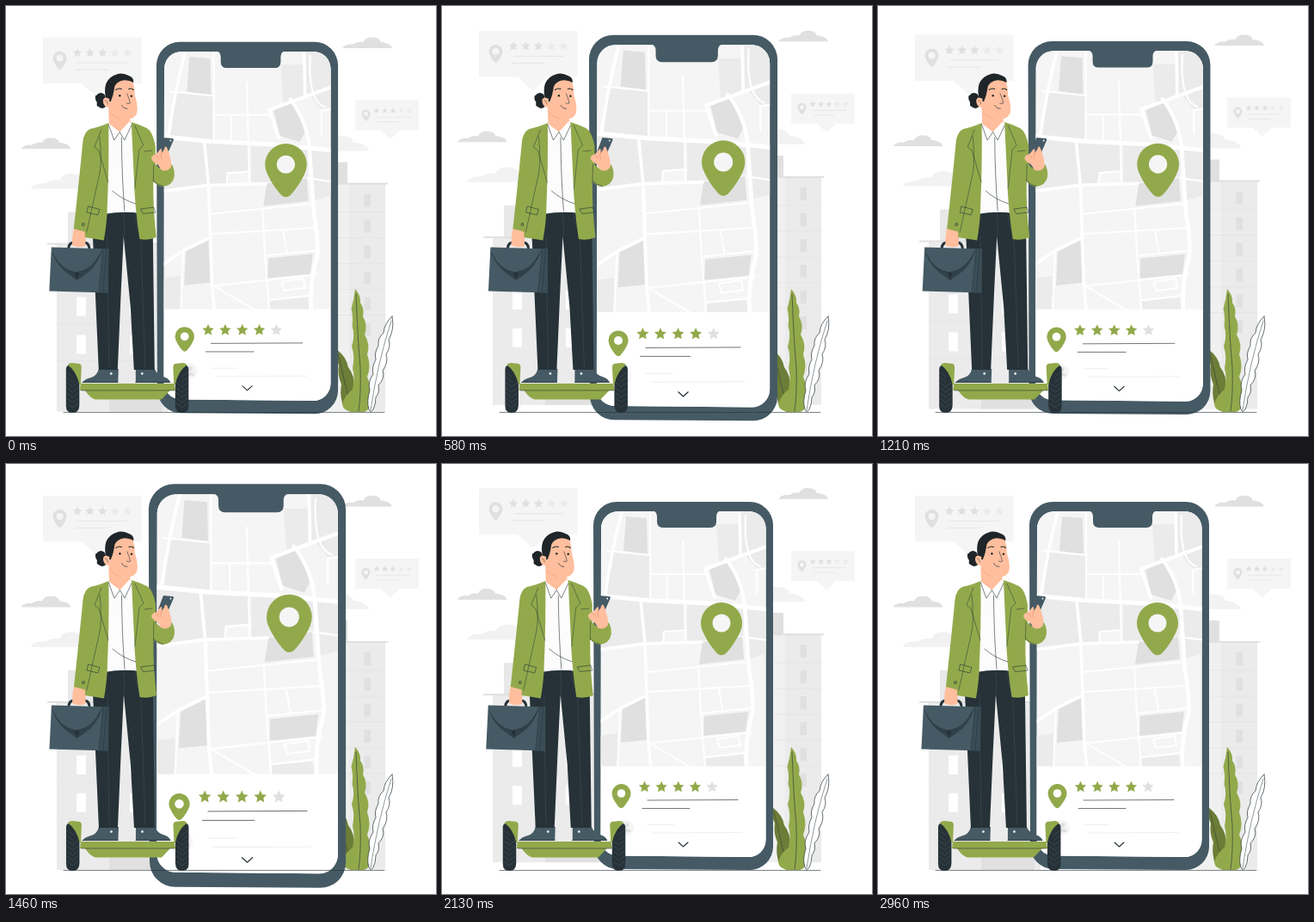
Write an HTML page with a canvas that moves like this. It is 500 px wide and 500 px high and loops after 3000 ms.

```html
<!DOCTYPE html>
<html lang="en">
<head>
<meta charset="utf-8">
<title>Map review</title>
<style>
html, body { margin: 0; width: 100%; height: 100%; overflow: hidden; background: #fff; }
canvas { display: block; width: 500px; height: 500px; }
</style>
</head>
<body>
<canvas id="stage"></canvas>
<script>
const canvas = document.getElementById('stage');
const ctx = canvas.getContext('2d');
const dpr = window.devicePixelRatio || 1;
canvas.width = canvas.height = 500 * dpr;

const LOOP = 3000, LEAD = 30;
const GREEN = '#92a94b', OLIVE = '#6c7d37', DARK = '#263238', SLATE = '#455a64', HAIR = '#1f2528', SKIN = '#ffbe9d';
const G1 = '#f5f5f5', G2 = '#ebebeb', G3 = '#e0e0e0';

const cache = {};
const path = d => cache[d] || (cache[d] = new Path2D(d));

function fill(d, color) {
  ctx.fillStyle = color;
  ctx.fill(path(d));
}
function line(d, color = DARK, w = 0.8) {
  ctx.strokeStyle = color;
  ctx.lineWidth = w;
  ctx.stroke(path(d));
}
function rect(x, y, w, h, color) {
  ctx.fillStyle = color;
  ctx.fillRect(x, y, w, h);
}
function dot(x, y, r, color) {
  ctx.fillStyle = color;
  ctx.beginPath();
  ctx.arc(x, y, r, 0, Math.PI * 2);
  ctx.fill();
}
function star(x, y, r, color) {
  ctx.fillStyle = color;
  ctx.beginPath();
  for (let i = 0; i < 10; i++) {
    const a = i * Math.PI / 5 - Math.PI / 2, q = i % 2 ? r * 0.48 : r;
    ctx.lineTo(x + q * Math.cos(a), y + q * Math.sin(a));
  }
  ctx.fill();
}
function stars(x, y, step, r, lit, color, dim) {
  for (let i = 0; i < 5; i++) star(x + i * step, y, r, i < lit ? color : dim);
}
function pin(x, y, r, drop, hole, color, inner) {
  ctx.fillStyle = color;
  ctx.beginPath();
  ctx.arc(x, y, r, Math.PI * 0.87, Math.PI * 0.13);
  ctx.bezierCurveTo(x + r * 0.74, y + r * 0.82, x + r * 0.42, y + drop * 0.82, x + r * 0.2, y + drop * 0.96);
  ctx.quadraticCurveTo(x, y + drop * 1.06, x - r * 0.2, y + drop * 0.96);
  ctx.bezierCurveTo(x - r * 0.42, y + drop * 0.82, x - r * 0.74, y + r * 0.82, x - r * 0.91, y + r * 0.4);
  ctx.fill();
  dot(x, y, hole, inner);
}
function cloud(x, y, s) {
  ctx.save();
  ctx.translate(x, y);
  ctx.scale(s, s);
  fill('M0 13C1 10 6 8 12 8.500C16 6 20 5 24 6C26 1 31 0 34 0.500C40 0 44 3 44 6C49 6 56 8 57.500 13Z', s > 1 ? '#f2f2f2' : G3);
  ctx.restore();
}

// Linear interpolation over [position, value] stops
function track(stops, p) {
  let i = 1;
  while (i < stops.length - 1 && p > stops[i][0]) i++;
  const [a, u] = stops[i - 1], [b, v] = stops[i];
  return u + (v - u) * (p - a) / (b - a);
}
const BEAT = [[0, 1], [0.1, 1.1], [0.3, 1], [0.4, 1], [0.5, 1.1], [0.6, 1], [1, 1]];
const SHAKE = [0, -1, 2, -4, 4, -4, 4, -4, 2, -1, 0].map((v, i) => [i / 10, v]);
const FLOAT = [[0, 0], [0.5, -10], [1, 0]];

function background() {
  fill('M43 37H157.500V90.500H122L106 107L88 90.500H43Z', G1);
  pin(62.5, 61, 8, 13, 4, G3, G1);
  stars(83, 55, 14.6, 5.6, 3, G3, G2);
  line('M84 66.500H141M81 74.500H119', '#e4e4e4', 0.9);

  fill('M406 110H480V145H458L447 155.500L436 145H406Z', G1);
  pin(418.5, 126, 5, 8, 2.5, G3, G1);
  stars(431, 122.3, 9.5, 3.6, 3, G3, G2);
  line('M430 129.500H470M432 135H456', '#e4e4e4', 0.8);

  cloud(391.5, 36.5, 1);
  cloud(18, 153.5, 1);
  cloud(29, 195, 1.38);
  cloud(343, 151, 1.38);

  rect(72, 240, 90, 37, '#e8e8e8');
  rect(59, 277, 130, 195, G2);
  rect(48, 276, 141, 2, G3);
  line('M59 326H189M59 370H189M59 413H189', '#e4e4e4', 0.7);
  for (const y of [296, 339, 383]) {
    rect(82, y, 11, 22, '#fff');
    rect(144, y, 11, 22, '#fff');
  }
  rect(120, 458, 62, 14, G3);

  rect(372, 182, 25, 25, G3);
  rect(370, 207, 71, 265, G2);
  rect(370, 207, 29, 265, '#f0f0f0');
  rect(370, 206, 74, 2, G3);
  line('M370 240H441M370 270H441M370 300H441M370 330H441M370 360H441', '#e2e2e2', 0.7);
  for (let i = 0; i < 6; i++) rect(416.5, 219 + i * 30, 7.5, 15, G3);
}

function plants() {
  fill('M384 399Q396 408 398 420Q406 431 404 441L408 472H402Q394 470 391 462Q388 450 390 440Q385 428 387 418Q383 410 384 399Z', OLIVE);
  line('M386 404Q393 435 402 470', DARK, 0.5);
  fill('M406 329Q413 337 412 345Q417 352 415 361Q421 371 417 382Q424 394 420 405Q425 419 420 431Q427 447 424 460Q424 470 416 472H403Q392 471 391 463Q394 452 403 446Q406 432 403 421Q406 407 402 396Q406 383 402.500 372Q404 362 401.500 352Q405 340 406 329Z', GREEN);
  line('M407 335Q409 390 412 420Q413 450 410 471', DARK, 0.6);
  const leaf = 'M449 361Q440 369 439 380Q432 386 433 395Q428 403 430 411Q425 420 427 428Q420 438 423 447Q419 460 422 469Q424 474 427 469Q430 463 430 455Q435 449 433 441Q441 433 438 424Q445 414 442 405Q448 396 445 388Q452 376 449 361Z';
  fill(leaf, '#fff');
  line(leaf, DARK, 0.7);
  line('M448 366Q432 415 424 470', DARK, 0.5);
}

function map() {
  rect(180, 50, 202, 302, G1);
  fill('M198 101L242 106V157L190 151Z', G2);
  fill('M232 158L283 162V208H236Z', G2);
  fill('M285 162L352 167L350 199L302 206H285Z', G2);
  fill('M184 155L231 159L235 207L184 214Z', G2);
  fill('M346 50H380V94L348 109Z', G2);
  fill('M353 106L380 96V121L366 122Z', G2);
  fill('M319 70H346V105L322 115Z', G2);
  fill('M353 168H380V220L358 226Z', G2);
  fill('M184 316L204 313V352H184Z', G2);
  fill('M307 342L350 338L352 352H306Z', G2);
  fill('M257 208L258 195L284 193V208Z', G1);

  fill('M214 61L238 63L239 105L211 101Z', G3);
  fill('M311 123L332 113L349 144L341 159L318 152Z', G3);
  fill('M303 207L349 201L351 227L299 233Z', G3);
  fill('M210 285L236 272L238 321L208 324Z', G3);
  fill('M305 293L356 288L353 311L304 316Z', G3);

  line('M182 153L240 158.500L310 162L380 169', '#fff', 5);
  line('M182 216L236 209L302 207M231 158L236 209L240 324L243 354', '#fff', 3.5);
  line('M352 165L357 240Q363 275 361 290Q352 320 354 354', '#fff', 4.5);
  line('M380 95L306 122M330 110Q349 135 352 165M306 122L317 155', '#fff', 4);
  line('M210 52Q198 95 190 152M346 52L347 105M182 301L209 283L238 269', '#fff', 3.5);
  line('M192 101L243 106M242 52V158M243 128H306M262 128V160M280 90L283 208', '#fff', 2);
  line('M257 208L258 195L284 193M351 201L380 205M366 150V123L378 121M353 60Q350 112 370 119', '#fff', 2.2);
  line('M239 242L356 230M239 265L358 258M298 237L301 290L360 284M322 262L326 286', '#fff', 2);
  line('M239 325L304 318L360 312M244 326L292 354M207 284L204 354M301 290L306 354', '#fff', 2);
  line('M320 320L345 316L347 327L323 330ZM306 341L352 336', '#fff', 2);
}

function phone(s) {
  ctx.save();
  ctx.translate(280.5, 257.5);
  ctx.scale(s, s);
  ctx.translate(-280.5, -257.5);
  fill('M203 44H358A27 27 0 0 1 385 71V445A27 27 0 0 1 358 472L204 471A27 27 0 0 1 177 444L176 71A27 27 0 0 1 203 44Z', SLATE);

  ctx.save();
  ctx.clip(path('M205 55H356.500A20 20 0 0 1 376.500 75V437A20 20 0 0 1 356.500 457L204 455.500A20 20 0 0 1 184.500 435.500L185 75A20 20 0 0 1 205 55Z'));
  rect(180, 50, 202, 412, '#fff');
  map();
  rect(180, 351.5, 202, 110, '#fff');
  ctx.restore();

  fill('M244 54Q250 55 250 61V67Q250 74 257 74H312Q319 74 319 67V61Q319 55 325 54Z', SLATE);
  pin(325, 185, 24, 37, 10.5, GREEN, G1);
  pin(208.5, 383, 11, 17, 4.8, GREEN, '#fff');
  stars(235.5, 375.7, 19.65, 7, 4, GREEN, G3);
  line('M239 391L344 390.500M233 400.500H288', DARK, 0.65);
  dot(214, 423, 9, G1);
  dot(214.5, 420, 2.8, G3);
  fill('M209 428Q210 424 214.500 424Q219 424 220 428Z', G3);
  line('M239 419.500H269M245 429L349 428.500', G2, 0.8);
  line('M275 440L280.500 445L286 440', DARK, 1.1);
  ctx.restore();
}

function wheel() {
  fill('M70 425Q69.500 417 74 418Q82 424 85.500 438V464Q85.500 473 77.500 473Q70 473 70 465Z', DARK);
  for (let y = 426; y < 468; y += 6) {
    ctx.strokeStyle = '#4b5b63';
    ctx.lineWidth = 0.5;
    ctx.beginPath();
    ctx.moveTo(71, y);
    ctx.lineTo(77.5, y + 5);
    if (y > 434) ctx.lineTo(84, y);
    ctx.stroke();
  }
  fill('M72 417.500Q73 415 77 415L86 416Q88 417 88 420L87 440H85.500Q82 424 72 417.500Z', GREEN);
}

function board() {
  fill('M87 439H196L197 447H191L181 457.500H104Q98 456 92 447H86Z', GREEN);
  line('M88 447H196', DARK, 0.6);
  wheel();
  ctx.save();
  ctx.translate(282.5, 0);
  ctx.scale(-1, 1);
  wheel();
  ctx.restore();
}

function legs() {
  fill('M108 422H131L130.500 438H89Q91 434 99 432Q106 430 108 422Z', SLATE);
  fill('M151 422H173Q176 429 183 431Q190 433 191.500 438H151Z', SLATE);
  line('M89 437.500H130M151 437.500H191', DARK, 0.7);
  dot(122.5, 427.5, 1.4, '#dfe5e8');
  dot(158.5, 427.5, 1.4, '#dfe5e8');
  fill('M115 238H155L171 265L173 423H149L145 350L137 268L134 330L130 423H108L101 265Z', DARK);
  line('M137 241Q139 258 137 268M118 268L120 420M157 272L162 420M150 243Q151 258 158 268', '#4b5a61', 0.4);
}

function bag() {
  line('M73 281Q74 275 79 275H91Q96 275 97 281', DARK, 3);
  fill('M53 280.500L119.500 282.500L119 333.500L50.500 331.500Z', SLATE);
  fill('M113 282L119.500 282.500L119 333.500L108 333Z', '#3a4d57');
  line('M113 283L108 332M117 283L113 332', DARK, 0.5);
  fill('M54 287Q60 304 76 314L82.500 319L90 314Q106 304 112 284L106 294Q98 308 82 310Q64 308 54 287Z', '#30414a');
  line('M54 287Q64 308 82 310Q102 307 112 284', DARK, 0.7);
  fill('M80 311Q83 308 85 311L83 318Z', DARK);
}

function torso() {
  fill('M118 138L132 146L146 136L156 241Q137 238 114 242Z', '#fcfcfc');
  line('M134.500 153Q135 200 138 238M124 215Q135 225 151 230', DARK, 0.6);

  fill('M79 258L93 262L92.500 279Q84 282 77 278Q77 268 79 258Z', SKIN);
  fill('M119.500 136Q108 141 98 143Q91 146 89.500 158Q86 195 79 259L92 262.500V269L114 272.500Q118 250 118 232Q120 190 119.500 136Z', GREEN);
  fill('M146 135Q156 138 164 142Q171 146 174 163V184Q180 192 188 191L193 184Q196.500 190 196 198Q194 209 182 210Q176 209 171.500 204Q171 235 175 269Q166 273 155.500 271Q150 235 149 200Z', GREEN);
  line('M109 152Q112 180 109 195L94 263M111 144L103 164L108 168L119 205', DARK, 0.5);
  line('M150 139L160 162L155 167L150 212M161 169L170 168M172 184L171.500 204M171.500 203Q177 209 183 209.500', DARK, 0.5);
  line('M96 233L109 236.500L107 243L94.500 240ZM157 236L172 234L174 240L160 241.500Z', DARK, 0.6);
  dot(90, 254, 1.8, DARK);
  dot(90, 254, 1.1, GREEN);
}

function head() {
  fill('M119 108L120 137Q125 146 133 147Q141 144 145 135L143 125Z', SKIN);
  fill('M120 137L126 156L132.500 146.500L138 156L146 141L144 134L132.500 146.500Z', '#fff');
  line('M119.500 138L126 156L132.500 146.500L138 156L146 139', DARK, 0.6);
  fill('M121 95Q128 80 147 85Q150 95 150 104Q153 112 153 120Q153 129 145 131Q139 132.500 133 131Q123 127 119 115Z', SKIN);
  line('M121 123Q125 129 133 131', '#e89b79', 0.5);

  dot(110.5, 106.5, 5.5, HAIR);
  dot(112, 114, 5, HAIR);
  fill('M104.500 104L112 103L108 117Q105 117 106 112Q103 108 104.500 104Z', HAIR);
  fill('M116 106Q113 90 122 83Q133 75 143 81Q149 83 148.500 89Q141 85 134 87Q126 90 126 97Q125 104 122 111L117 111Z', HAIR);
  fill('M120.500 108Q114 104 113 110Q113 117 119.500 118Z', SKIN);
  line('M115.500 110Q118 110 118.500 114', DARK, 0.5);

  line('M128 97.500Q131 95 134.500 96.500M143 96.500Q146 95 148.500 97.500', HAIR, 1.1);
  dot(132.5, 104.3, 1.2, HAIR);
  dot(146, 104.8, 1.2, HAIR);
  line('M141 102Q144 109 144.500 113Q142 114.500 140.500 113', DARK, 0.6);
  line('M134.500 115.500Q137 120 141 119.500', DARK, 0.7);
}

function hand() {
  fill('M183 153L194 154Q195.500 154.500 195 156L188 172Q187 174 185 173L177 169Z', SLATE);
  dot(191.5, 156.5, 0.9, '#fff');
  fill('M169 177Q170 173 175 172L180 166Q182 166 181 171L184 167Q185 162 187 164Q190 170 191 176Q193 181 192 188Q186 194 180 190Q178 184 173 182Q170 180 169 177Z', SKIN);
  line('M181 171Q179 175 181 178M174 173Q177 174 178 178', '#d98662', 0.5);
}

function frame(now) {
  const t = (now + LEAD) % LOOP;
  const half = t % (LOOP / 2) / (LOOP / 2);
  ctx.setTransform(dpr, 0, 0, dpr, 0, 0);
  ctx.lineCap = ctx.lineJoin = 'round';
  rect(0, 0, 500, 500, '#fff');

  ctx.save();
  ctx.translate(0, track(FLOAT, half));
  background();
  ctx.restore();

  plants();
  phone(track(BEAT, t / LOOP));
  line('M67 472.500H440', DARK, 0.6);

  ctx.save();
  ctx.translate(track(SHAKE, half), 0);
  board();
  legs();
  bag();
  torso();
  head();
  hand();
  ctx.restore();
}

function tick(now) {
  frame(now);
  requestAnimationFrame(tick);
}
frame(0);
requestAnimationFrame(tick);
</script>
</body>
</html>
```
